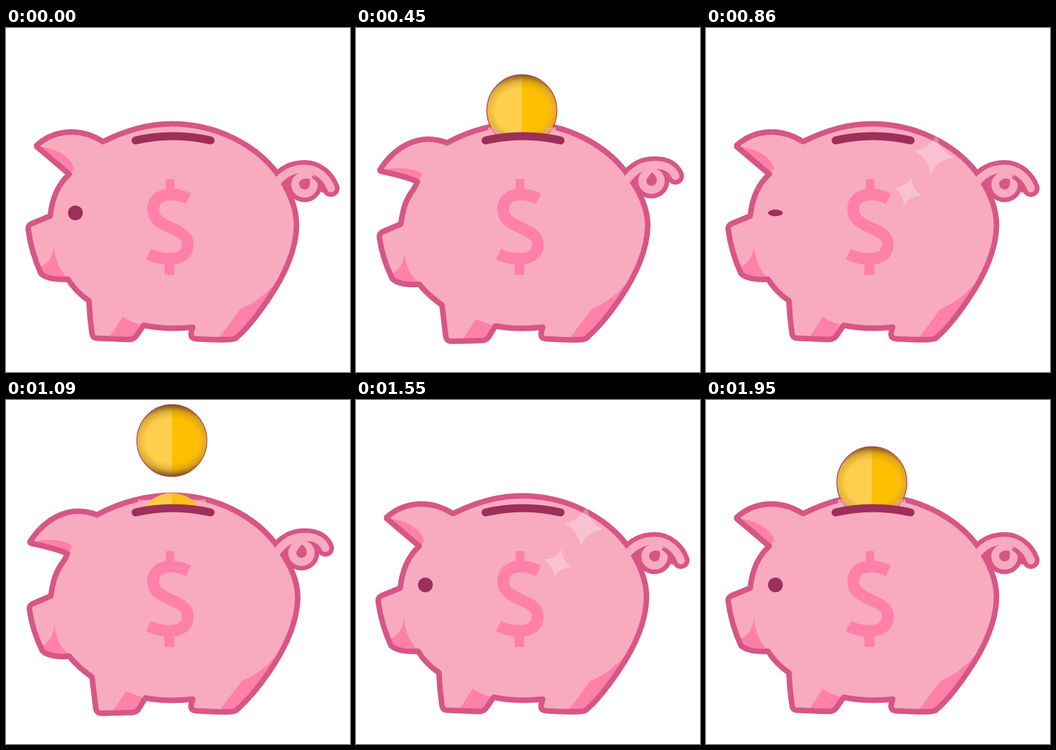
These frames come from a looping animation (560 by 560 pixels, 1990 ms). An HTML page with a canvas:

```html
<!DOCTYPE html>
<html lang="en">
<head>
<meta charset="utf-8">
<title>Piggy bank</title>
<style>
html, body { margin: 0; width: 100%; height: 100%; overflow: hidden; background: #fff; }
canvas { display: block; width: 560px; height: 560px; }
</style>
</head>
<body>
<canvas id="stage" width="560" height="560"></canvas>
<script>
const ctx = document.getElementById('stage').getContext('2d');
const LOOP = 1990, HOLD = 140, STEP = 45.25;
const PINK = '#f8aabf', SHADE = '#ff80a8', LINE = '#d75686', DARK = '#9d2f5b';
const path = d => new Path2D(d);

const earsUp = {
  body: path('M50 191C72 171 113 157 158 185C200 164 235 156 270 156C342 156 406 190 441 236C464 268 473 295 473 322C472 362 455 401 426 443C409 468 391 491 374 505C369 509 335 507 309 506C298 505 301 496 304 487C278 490 250 489 224 484L213 500C209 506 205 507 196 507L149 505C143 505 141 503 140 497Q136 470 135 444Q114 430 101 409C84 410 66 408 57 400C47 378 39 350 36 327C36 322 38 320 43 318L72 306C75 277 84 255 103 238L50 193Z'),
  shades: [
    path('M54 193C82 196 105 209 111 229L104 237Z'),
    path('M78 355C77 373 67 385 54 390L60 400C73 407 88 405 101 408C88 395 80 378 78 355Z'),
    path('M190 470L168 504L200 505Q208 505 211 499L223 484Q205 480 190 470Z'),
    path('M446 406C425 434 402 449 382 457L346 505L368 505C394 483 423 446 446 406Z')
  ],
  arch: path('M441 251C454 235 470 229 486 229C508 229 523 245 529 261'),
  ring: path('M501 255A15 14.5 0 1 1 471 255A15 14.5 0 1 1 501 255'),
  hole: path('M477 253C478 247 487 243 494 246C497 254 493 261 486 261Q478 260 477 253Z'),
  crease: path('M500 243Q511 250 515 266'),
  eye: [113, 301, 0]
};

const earsDown = {
  body: path('M39 231C58 201 97 167 148 187C190 164 235 155 270 155C342 155 405 190 438 233C464 268 475 295 475 322C474 362 457 401 428 443C411 468 391 491 375 505C370 510 335 507 309 506C298 505 301 496 304 487C278 490 252 490 227 485L216 503C212 509 206 509 198 509L156 510C149 510 147 507 146 501L140 451Q116 434 103 417C85 419 66 416 59 408C49 388 41 362 38 340C38 335 40 333 45 331L73 319C76 297 80 283 89 269Q95 262 100 250Q82 242 40 233Z'),
  shades: [
    path('M43 231C68 225 99 228 108 238L101 250Q75 239 43 231Z'),
    path('M79 367C77 386 68 396 56 402L62 410C75 417 90 414 104 416C89 404 81 388 79 367Z'),
    path('M195 474L174 507L202 507Q211 507 214 501L226 485Q209 480 195 474Z'),
    path('M447 407C426 435 404 449 384 457L348 505L369 505C396 483 424 447 447 407Z')
  ],
  arch: path('M441 247C454 230 470 222 486 223C505 222 516 231 520 241'),
  ring: path('M496 249A15 14.5 0 1 1 466 249A15 14.5 0 1 1 496 249'),
  hole: path('M482 235C492 243 492 253 482 254C472 253 472 244 482 235Z'),
  crease: path('M500 235Q505 240 507 249'),
  eye: [115, 311, -.08]
};

const slot = path('M211 183Q272 169 333 183');
const dollar = path('M297 278C285 272 277 271 268 271C250 271 239.5 281 239.5 295C239.5 311 251 317 268 325C286 333 296 339 296 352C296 368 284 376 266 376C253 376 242 373 232 368');

// All timings below are in steps of the clock.
const coins = [4.4, 7, 19.95, 21.95, 37.3, 40];
const sparkles = [11, 26];
const eyeKeys = [[-1, 1], [0, 1], [3, 0], [10, 0], [13, 1], [15, 1], [16, .45], [17, 0], [26, 0], [27, .07], [29, 1], [41, 1]];

function keyed(keys, k) {
  const i = Math.max(1, keys.findIndex(p => p[0] >= k));
  const [a, u] = keys[i - 1], [b, v] = keys[i];
  return u + (v - u) * (k - a) / (b - a);
}

function stroke(shape, color, width, cap = 'round') {
  ctx.strokeStyle = color;
  ctx.lineWidth = width;
  ctx.lineCap = cap;
  ctx.lineJoin = 'round';
  ctx.stroke(shape);
}

function fill(shape, color) {
  ctx.fillStyle = color;
  ctx.fill(shape);
}

function drawPig(pig, open) {
  stroke(pig.arch, LINE, 28);
  stroke(pig.ring, LINE, 28);
  fill(pig.body, PINK);
  pig.shades.forEach(s => fill(s, SHADE));
  stroke(pig.body, LINE, 9);

  // the tail opens into the body, so its pink goes over the outline
  stroke(pig.arch, PINK, 13);
  stroke(pig.ring, PINK, 13);
  fill(pig.hole, LINE);
  stroke(pig.crease, LINE, 4);

  stroke(dollar, SHADE, 19, 'butt');
  ctx.fillStyle = SHADE;
  ctx.beginPath();
  ctx.roundRect(260, 246, 14, 24, 1);
  ctx.roundRect(258, 377, 16, 25, 1);
  ctx.fill();
  if (open > 0) {
    const [x, y, tilt] = pig.eye;
    ctx.fillStyle = DARK;
    ctx.beginPath();
    ctx.ellipse(x, y, 12, 12 * open, tilt, 0, 7);
    ctx.fill();
  }
}

function halves(left, right) {
  ctx.fillStyle = left;
  ctx.fillRect(-60, -60, 60, 120);
  ctx.fillStyle = right;
  ctx.fillRect(0, -60, 60, 120);
}

function clipOval(rx, ry) {
  ctx.beginPath();
  ctx.ellipse(0, 0, rx, ry, 0, 0, 7);
  ctx.clip();
}

function drawCoin(top) {
  if (top < -118 || top > 172) return;
  ctx.save();
  ctx.beginPath();
  ctx.rect(200, 0, 140, 173);
  ctx.clip();

  ctx.save();
  ctx.translate(270, top + 58.5);
  ctx.save();
  clipOval(57, 58.5);
  halves('#fbc944', '#fbbd1c');
  ctx.save();
  clipOval(44, 47);
  halves('#ffcf4c', '#ffbf00');
  ctx.restore();
  // the rim shadow fades as the coin sinks into the slot
  ctx.globalAlpha = Math.max(0, Math.min(1, (150 - top) / 80));
  ctx.scale(1.25, 1);
  const rim = ctx.createRadialGradient(0, 0, 36, 0, 0, 59);
  rim.addColorStop(0, 'rgba(95,65,0,0)');
  rim.addColorStop(.5, 'rgba(95,65,0,.2)');
  rim.addColorStop(1, 'rgba(75,45,5,.8)');
  ctx.fillStyle = rim;
  ctx.fillRect(-60, -60, 120, 120);
  ctx.restore();
  if (top < 140) {
    ctx.strokeStyle = '#b8486a';
    ctx.lineWidth = 1.5;
    ctx.beginPath();
    ctx.ellipse(0, 0, 57, 58.5, 0, 0, 7);
    ctx.stroke();
  }
  ctx.restore();

  // soft pink haze beside the coin where it meets the slot
  if (top > 45) {
    const haze = ctx.createRadialGradient(270, 166, 30, 270, 166, 58);
    haze.addColorStop(0, 'rgba(248,170,191,0)');
    haze.addColorStop(1, 'rgba(248,170,191,.9)');
    ctx.fillStyle = haze;
    ctx.fillRect(215, 162, 110, 11);
  }
  ctx.restore();
}

function drawStar(x, y, r, turn) {
  ctx.save();
  ctx.translate(x, y);
  ctx.rotate(turn);
  ctx.beginPath();
  ctx.moveTo(r, 0);
  for (let i = 1; i <= 4; i++) {
    const a = i * Math.PI / 2, m = a - Math.PI / 4;
    ctx.quadraticCurveTo(Math.cos(m) * r * .32, Math.sin(m) * r * .32, Math.cos(a) * r, Math.sin(a) * r);
  }
  ctx.fill();
  ctx.restore();
}

function drawSparkles(p) {
  if (p < 0 || p > 8) return;
  ctx.globalAlpha = Math.max(0, .82 - .1 * p);
  ctx.fillStyle = '#f7f3f7';
  const turn = (49 - 8 * p) * Math.PI / 180;
  drawStar(370.5, 273.5 - 13.6 * p, 36 - .6 * p, turn);
  drawStar(328.5, 343.5 - 15.5 * p, 26 - .4 * p, turn + .12);
  ctx.globalAlpha = 1;
}

function draw(now) {
  const t = now % LOOP;
  const k = t < HOLD ? -1 : Math.min(40, Math.floor((t - HOLD) / STEP + .16));
  const down = (k >= 3 && k < 12) || (k >= 17 && k < 30);
  ctx.fillStyle = '#fff';
  ctx.fillRect(0, 0, 560, 560);
  drawPig(down ? earsDown : earsUp, keyed(eyeKeys, k));
  coins.forEach(c => drawCoin(76 + 72 * (k - c)));
  stroke(slot, DARK, 13);
  sparkles.forEach(s => drawSparkles(k - s));
}

const start = performance.now();
function tick() {
  draw(performance.now() - start);
  requestAnimationFrame(tick);
}
tick();
</script>
</body>
</html>
```
